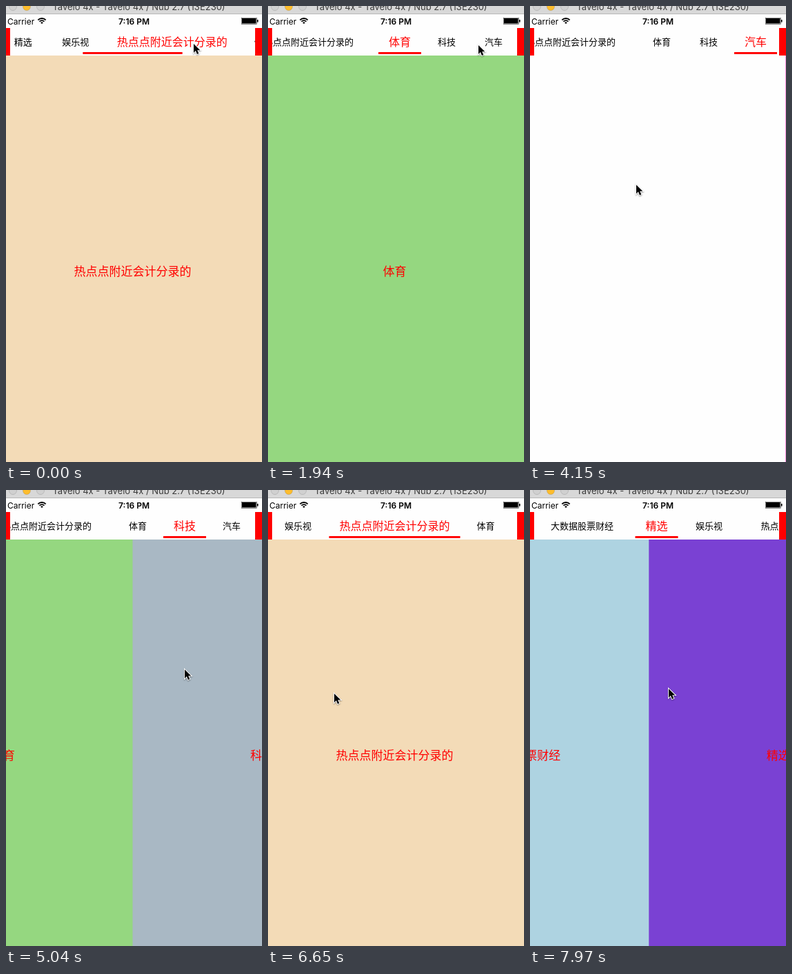
An HTML page with a canvas that plays this animation: 371 by 663 pixels, repeating every 8000 ms.

```html
<!DOCTYPE html>
<html lang="zh-CN">
<head>
<meta charset="utf-8">
<title>Tabs</title>
<style>
html, body { margin: 0; width: 371px; height: 663px; overflow: hidden; background: #fefefe; }
canvas { display: block; }
</style>
</head>
<body>
<canvas id="stage" width="371" height="663"></canvas>
<script>
const g = document.getElementById('stage').getContext('2d');
const LOOP = 8000, TICK = 147.5, LAST = 54; // the screen refreshes once per tick
const PAGE = 375, LEFT = -4, BAR = { x: 6, w: 355 };
const SETTLE = 3, SLIDE = 2.03, GLIDE = 1.5; // ticks: page swipe, tab bar, pointer travel
const CJK = '"Noto Sans CJK SC", "Noto Sans CJK", sans-serif';
const LATIN = 'Inter, sans-serif';

const tabs = [
  ['大数据股票财经', '#aed3e1'], ['精选', '#7a41d3'], ['娱乐视', '#6ba272'],
  ['热点点附近会计分录的', '#f3dbb7'], ['体育', '#95d780'],
  ['科技', '#a9b8c4'], ['汽车', '#f500b5']
].map(([name, color]) => ({ name, color, w: name.length * 16 }));
let total = 0;
for (const tab of tabs) {
  tab.c = total + 18 + tab.w / 2;
  total += tab.w + 36;
}

// A tap switches at once; a swipe drags the page and picks its tab when settled.
const tap = (at, hold, x, y, to) => ({ at, hold, x, y, to, picked: at });
const swipe = (at, x, y, to) => ({ at, hold: 2, x, y, to, picked: at + SETTLE, drag: true });
const gestures = [
  tap(-1.14, 6.6, 271, 54, 3), tap(8, 5, 304, 56, 4),
  tap(16, 2, 326, 55, 6), tap(20, 0.35, 311, 255, 6),
  swipe(25.06, 57, 257, 5), swipe(32.5, 70, 260, 4), swipe(38.1, 87, 267, 3),
  swipe(45.22, 95, 295, 2), swipe(49, 126, 298, 1), swipe(52.56, 24, 288, 0)
];
const opened = gestures.find(s => s.to === 5).picked;

const mix = (a, b, p) => a + (b - a) * p;
const ease = u => { u = Math.min(1, Math.max(0, u)); return u * u * (3 - 2 * u); };
const lastIndex = (k, key) => gestures.filter(s => s[key] <= k).length - 1;
const dragged = (s, k) => s.drag ? ease((k - s.at) / SETTLE) : 1;

function rect(x, y, w, h, color) {
  g.fillStyle = color;
  g.fillRect(x, y, w, h);
}

function text(s, x, y, font, color, align = 'center') {
  g.font = font;
  g.fillStyle = color;
  g.textAlign = align;
  g.fillText(s, x, y);
}

function drawPages(k) {
  const n = lastIndex(k, 'at'), s = gestures[n];
  const pos = s.drag ? mix(gestures[n - 1].to, s.to, dragged(s, k)) : s.to;
  tabs.forEach((tab, i) => {
    const x = LEFT + (i - pos) * PAGE;
    if (x >= 371 || x + PAGE <= 0) return;
    const empty = i === 5 && k < opened; // this page loads when first opened
    rect(x, 72, PAGE + 1, 591, empty ? '#fefefe' : tab.color);
    if (!empty) text(tab.name, x + PAGE / 2, 392, '17px ' + CJK, '#f00');
  });
}

const barOffset = tab => Math.max(0, Math.min(total - BAR.w, tab.c - BAR.w / 2));

function drawBar(k) {
  const n = lastIndex(k, 'picked'), now = gestures[n].to;
  const from = tabs[n ? gestures[n - 1].to : 2], to = tabs[now];
  const p = ease((k - gestures[n].picked) / SLIDE);
  const shift = BAR.x - mix(barOffset(from), barOffset(to), p);

  rect(0, 32, 371, 40, '#f00');
  g.save();
  g.beginPath();
  g.rect(BAR.x, 32, BAR.w, 40);
  g.clip();
  rect(BAR.x, 32, BAR.w, 40, '#fefefe');
  tabs.forEach((tab, i) => {
    const on = i === now;
    text(tab.name, tab.c + shift, on ? 58 : 57, (on ? 16 : 13) + 'px ' + CJK, on ? '#f00' : '#000');
  });
  const w = mix(from.w, to.w, p) + 30;
  rect(mix(from.c, to.c, p) + shift - w / 2, 67, w, 3, '#f00');
  g.restore();
}

function drawTop() {
  rect(0, 0, 371, 11, '#d8d8d8');
  rect(0, 11, 371, 1, '#b8b8b8');
  ['#d0d0d0', '#fdbd2e', '#d0d0d0'].forEach((fill, i) => {
    g.beginPath();
    g.arc(10 + i * 20, 1, 5.5, 0, 7);
    g.fillStyle = fill;
    g.fill();
    g.lineWidth = 1;
    g.strokeStyle = 'rgba(0,0,0,.12)';
    g.stroke();
  });
  text('Tavelo 4x - Tavelo 4x / Nub 2.7 (13E230)', 192.5, 6, '13px ' + LATIN, '#3c3c3c');

  rect(0, 12, 371, 20, '#fefefe');
  text('Carrier', 2, 27, '12px ' + LATIN, '#000', 'left');
  text('7:16 PM', 185.5, 27, '600 12px ' + LATIN, '#000');
  g.strokeStyle = '#000';
  g.lineWidth = 1.8;
  for (const r of [4.9, 8]) {
    g.beginPath();
    g.arc(52, 26, r, -Math.PI * 0.75, -Math.PI * 0.25);
    g.stroke();
  }
  g.beginPath();
  g.moveTo(52, 26);
  g.arc(52, 26, 2.6, -Math.PI * 0.75, -Math.PI * 0.25);
  g.fill();
  g.lineWidth = 0.5;
  g.strokeRect(341.25, 17.25, 22, 9);
  rect(342, 18, 20.5, 7.5, '#000');
  rect(364, 20, 1.5, 3.5, '#000');
}

function pointerAt(k) {
  const n = lastIndex(k, 'at'), s = gestures[n], next = gestures[n + 1] || s;
  const leave = s.at + s.hold;
  const pull = s.drag ? PAGE * dragged(s, Math.min(k, leave)) : 0;
  const p = ease((k - leave) / GLIDE);
  return [mix(Math.min(350, s.x + pull), next.x, p), mix(s.y, next.y, p)];
}

function drawPointer(k) {
  const [x, y] = pointerAt(k);
  const arrow = new Path2D('M.5 .5V14.3L3.6 11.3 5.8 16.4 8.3 15.3 6.1 10.3H10.4Z');
  g.save();
  g.translate(Math.round(x) + 0.5, Math.round(y) + 0.5);
  g.scale(0.94, 0.94);
  g.shadowColor = 'rgba(0,0,0,.4)';
  g.shadowBlur = 2;
  g.shadowOffsetY = 1;
  g.lineWidth = 2;
  g.strokeStyle = '#fff';
  g.stroke(arrow);
  g.shadowColor = 'transparent';
  g.fillStyle = '#000';
  g.fill(arrow);
  g.restore();
}

const begin = performance.now();
function frame() {
  const t = (performance.now() - begin) % LOOP;
  const k = Math.min(LAST, Math.max(0, Math.floor((t - 2) / TICK)));
  rect(0, 0, 371, 663, '#fefefe');
  drawPages(k);
  drawBar(k);
  drawTop();
  drawPointer(k);
  requestAnimationFrame(frame);
}
frame();
</script>
</body>
</html>
```
